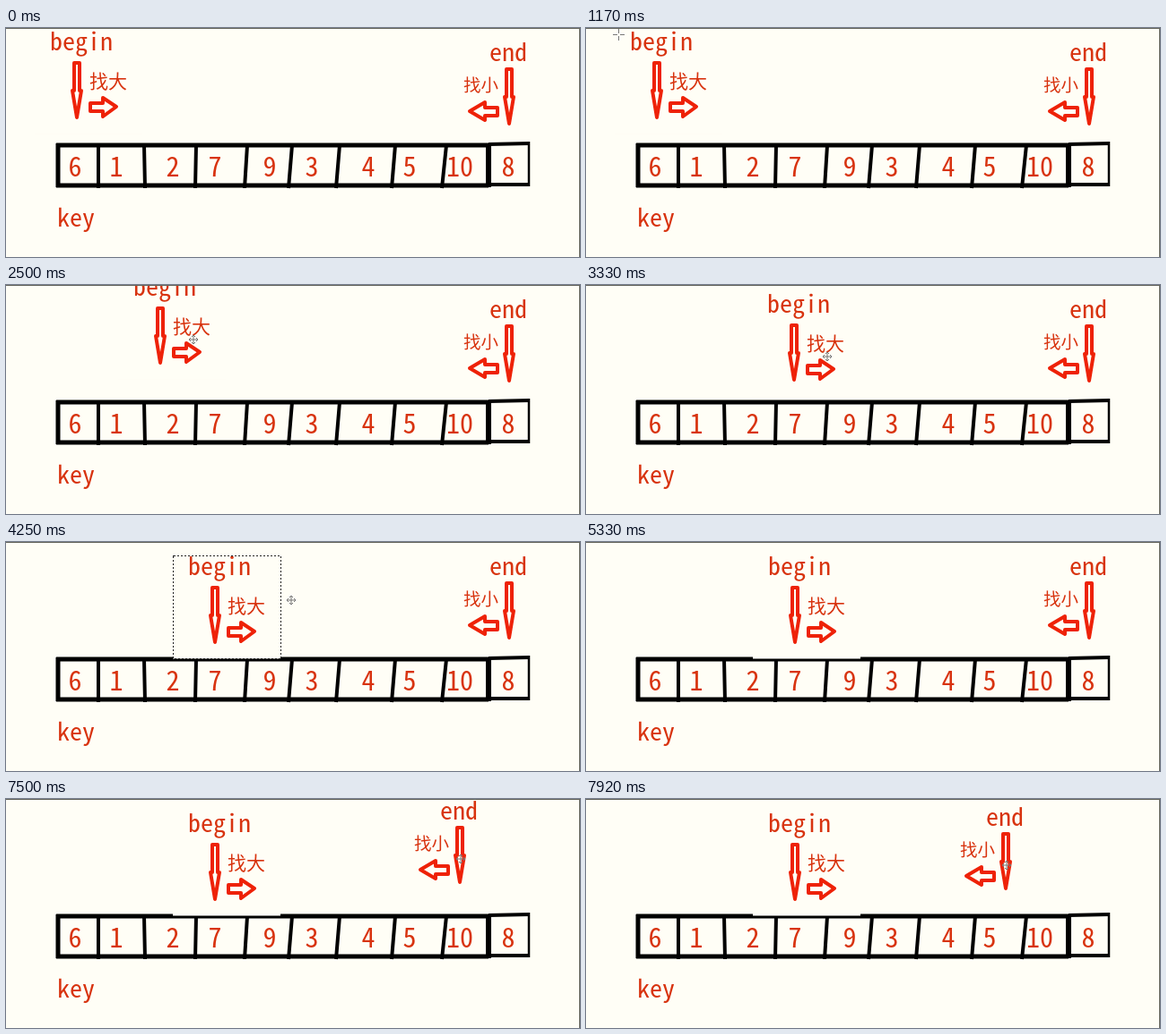
Recreate the animation shown at these times as an HTML page. Size 640 px wide and 256 px high, loop 8 s.

```html
<!DOCTYPE html>
<html lang="zh">
<head>
<meta charset="utf-8">
<style>
html, body { margin: 0; width: 100%; height: 100%; overflow: hidden; background: #fffef6; }
svg { display: block; }
text { fill: #d8330f; font-family: "Noto Sans Mono CJK SC", "Noto Sans CJK SC", "Noto Sans Mono", monospace; font-size: 28px; }
.cjk { font-size: 21px; }
.num text { font-size: 30px; text-anchor: middle; }
.arrow { fill: #fffef6; stroke: #ee2208; stroke-width: 4; stroke-linejoin: round; }
.pad { fill: #fffef6; }
.table { fill: none; stroke: #000; stroke-width: 5; }
.ants { fill: none; stroke: #222; stroke-dasharray: 2 2; shape-rendering: crispEdges; }
.cursor { fill: none; stroke: #777; }
</style>
</head>
<body>
<svg width="640" height="256" viewBox="0 0 640 256">
  <defs>
    <path id="down" class="arrow" d="M-3 2H3V33H5L0 63L-5 33H-3Z"/>
  </defs>
  <g class="table">
    <path d="M56 131H538M56 176H538M58 129V178"/>
    <path id="bars" stroke-width="4"/>
    <path d="M538 129V178" stroke-width="6"/>
    <path d="M538 130L584 129" stroke-width="4"/>
    <path d="M538 175H584" stroke-width="4"/>
    <path d="M583 127V177" stroke-width="2.5"/>
  </g>
  <g id="nums" class="num"></g>
  <text x="57" y="222">key</text>
  <g id="begin">
    <rect class="pad" x="32" y="3" width="120" height="115.5"/>
    <text x="49" y="25" textLength="">begin</text>
    <use href="#down" x="79" y="37"/>
    <text class="cjk" x="93" y="67">找大</text>
    <path class="arrow" d="M94 84H108V78L123 88L108 99V93H94Z"/>
  </g>
  <g id="end">
    <rect class="pad" x="499" y="6" width="94" height="104"/>
    <text x="539" y="37">end</text>
    <use href="#down" x="561" y="44"/>
    <text class="cjk" x="510" y="71" style="font-size:19.5px">找小</text>
    <path class="arrow" d="M548 89H534V83L517 93L534 103V98H548Z"/>
  </g>
  <rect id="ants" class="ants"/>
  <path id="cross" class="cursor" d="M-6 .5H-1M2 .5H7M.5 -6V-1M.5 2V7"/>
  <path id="move" class="cursor" d="M-5 0H5M0 -5V5M-3 -2L-5 0L-3 2M3 -2L5 0L3 2M-2 -3L0 -5L2 -3M-2 3L0 5L2 3"/>
  <path d="M0 .5H640M639.5 0V256" stroke="#66665c" fill="none"/>
</svg>
<script>
const $ = id => document.getElementById(id);
const LOOP = 8000, FPS = 12;

// dividers: top x, bottom x
const bars = [[103, 103], [154, 155], [212, 211], [269, 266], [319, 315], [372, 368], [434, 430], [491, 486]];
$('bars').setAttribute('d', bars.map(([a, b]) => `M${a} 131L${b} 179`).join(''));

const cells = [[6, 77], [1, 123], [2, 186], [7, 233], [9, 294], [3, 341], [4, 404], [5, 450], [10, 506], [8, 560]];
$('nums').innerHTML = cells.map(([n, x]) => `<text x="${x}" y="166">${n}</text>`).join('');

// rows: time, x, y
const beginPath = [[2080, 0, 0], [2250, 18, -4], [2500, 93, -13], [2920, 143, -9], [3170, 151, 2], [3330, 153, 6], [3670, 153, 6], [3750, 154, 12]];
const endPath = [[6920, 0, 0], [7250, -27, -16], [7500, -55, -14], [7750, -79, -10], [7920, -93, -7]];
const beginDrag = [[1250, 34, 5], [1330, 40, 12], [1670, 95, 70], [2000, 152, 118]];
const endDrag = [[5670, 500, 7], [5750, 503, 12], [6170, 545, 68], [6500, 580, 104], [6670, 593, 110]];
const crossPath = [[1080, 43, 14], [1170, 36, 7], [1250, 36, 7], [1330, 43, 16], [1670, 98, 75], [2000, 155, 123]];
const crossBack = [[4330, 330, 60], [4750, 494, 7]];
const crossEnd = [[5750, 507, 16], [6170, 550, 73], [6500, 581, 110], [6670, 598, 115]];
const moveBack = [[3920, 270, 86], [4330, 330, 60]];

function at(rows, t) {
  if (t <= rows[0][0]) return rows[0].slice(1);
  for (let i = 1; i < rows.length; i++) {
    const [t0, x0, y0] = rows[i - 1], [t1, x1, y1] = rows[i];
    if (t <= t1) {
      const k = (t - t0) / (t1 - t0);
      return [x0 + (x1 - x0) * k, y0 + (y1 - y0) * k].map(Math.round);
    }
  }
  return rows[rows.length - 1].slice(1);
}

function place(id, pos) {
  const el = $(id);
  el.style.display = pos ? '' : 'none';
  if (pos) el.setAttribute('transform', `translate(${pos})`);
}

function setAnts(box) {
  $('ants').style.display = box ? '' : 'none';
  if (!box) return;
  const [x, y, x2, y2] = box;
  const size = { x: x + .5, y: y + .5, width: x2 - x, height: y2 - y };
  for (const key in size) $('ants').setAttribute(key, size[key]);
}

function draw(t) {
  const within = (a, b) => t >= a && t < b;
  const a = at(beginPath, t), b = at(endPath, t);
  place('begin', a);
  place('end', b);

  let box = null, cross = null, move = null;
  if (within(1330, 2170)) box = [32, 3, ...at(beginDrag, t)];
  else if (within(3750, 4830)) box = [186, 15, 306, 130];
  else if (within(5750, 7000)) box = [499, 6, ...at(endDrag, t)];
  setAnts(box);

  if (within(1080, 2170)) cross = at(crossPath, t);
  else if (within(4330, 4830)) cross = at(crossBack, t);
  else if (within(5750, 6830)) cross = at(crossEnd, t);
  else if (within(2170, 3920)) move = [a[0] + 116, a[1] + 74];
  else if (within(3920, 4330)) move = at(moveBack, t);
  else if (t >= 6830) move = [b[0] + 562, b[1] + 81];
  place('cross', cross);
  place('move', move);
}

function tick() {
  const t = performance.now() % LOOP;
  const step = Math.floor((t + 4) * FPS / 1000);
  draw(Math.round(step * 100 / FPS) * 10);
  requestAnimationFrame(tick);
}
tick();
</script>
</body>
</html>
```
